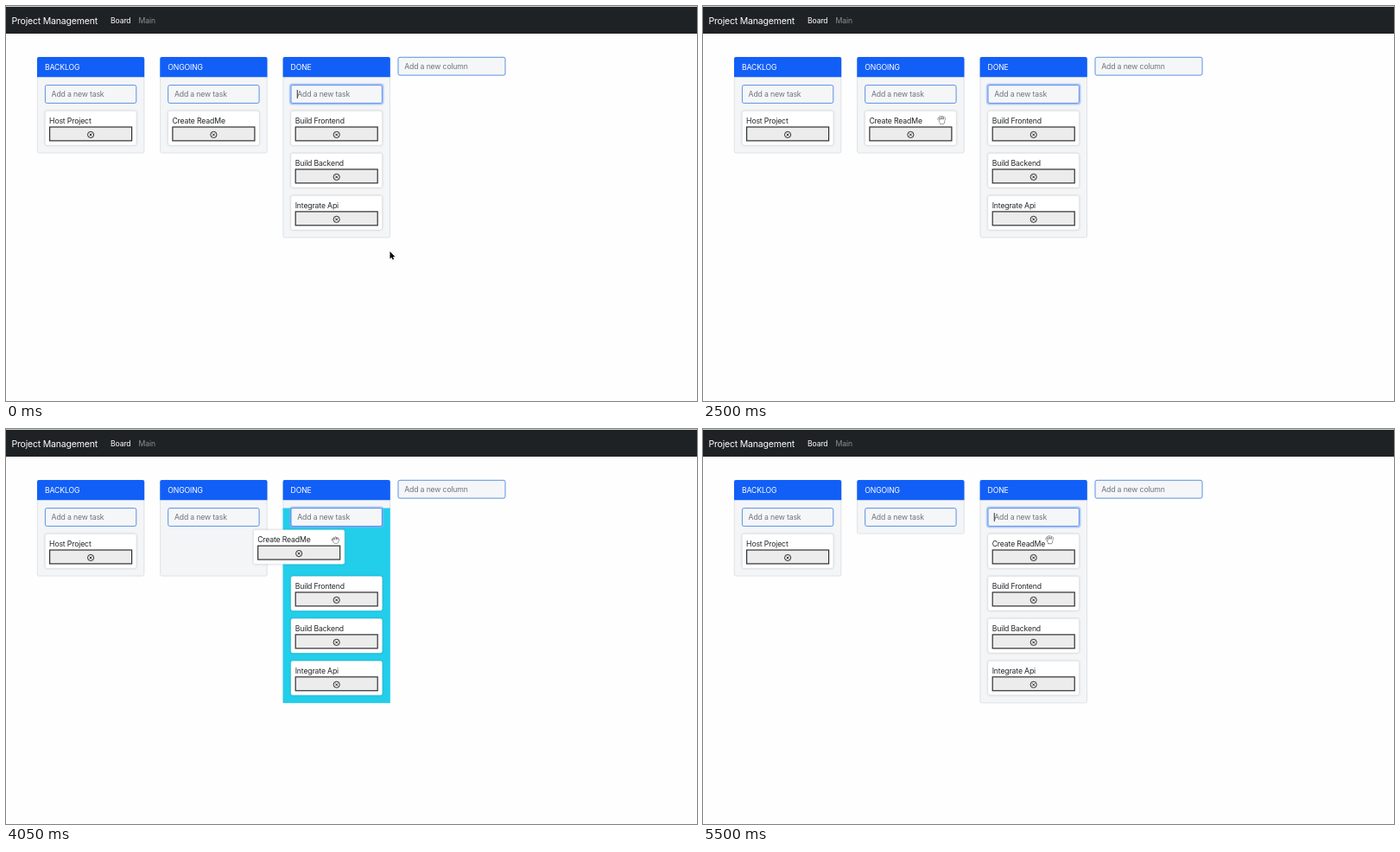
Recreate the animation shown at these times as an HTML page. Size 800 by 457 pixels, loop 5.55 s.

```html
<!DOCTYPE html>
<html lang="en">
<head>
<meta charset="utf-8">
<title>Project board</title>
<style>
  html, body { margin: 0; width: 100%; height: 100%; overflow: hidden; background: #fefefe; }
  svg { display: block; width: 800px; height: 457px; }
  text { font: 8.7px Inter, "Open Sans", sans-serif; letter-spacing: -.16px; fill: #212529; }
  .brand { font-size: 10.5px; letter-spacing: -.18px; }
  .light { fill: #fff; }
  .hint { fill: #6c757d; }
  .card { filter: drop-shadow(0 .8px .9px rgba(0, 0, 0, .2)); }
</style>
</head>
<body>
<svg id="stage" viewBox="0 0 800 457"></svg>
<script>
const LOOP = 5550, STEP = 50;
const TOP = 59, PITCH = 142.3, SLOT = 48.95, EMPTY_BOTTOM = 121.4;
const stage = document.getElementById('stage');

function add(parent, tag, attrs = {}, content) {
  const el = document.createElementNS('http://www.w3.org/2000/svg', tag);
  for (const key in attrs) el.setAttribute(key, attrs[key]);
  if (content) el.textContent = content;
  parent.appendChild(el);
  return el;
}
const box = (parent, x, y, width, height, fill, more = {}) =>
  add(parent, 'rect', { x, y, width, height, fill, ...more });
const label = (parent, x, y, content, cls = '') =>
  add(parent, 'text', { x, y, class: cls }, content);
const move = (el, x, y) => el.setAttribute('transform', `translate(${x} ${y})`);
const show = (el, on) => el.setAttribute('visibility', on ? 'visible' : 'hidden');

function field(parent, x, y, width, hint, focused) {
  if (focused) {
    box(parent, x - 1.2, y - 1.2, width + 2.4, 23.2, 'none',
      { rx: 3, stroke: '#86b0fa', 'stroke-opacity': .6, 'stroke-width': 2 });
  }
  box(parent, x, y, width, 20.8, '#f5f6f8',
    { rx: 2, stroke: focused ? '#4b84e6' : '#4a86e4', 'stroke-width': .9 });
  label(parent, x + 7.2, y + 13.7, hint, 'hint');
}

function column(index, title, focused) {
  const g = add(stage, 'g');
  move(g, 36 + index * PITCH, 0);
  const body = box(g, .3, TOP + .3, 123.6, 10, '#f4f5f7',
    { rx: 2, stroke: '#d9dce1', 'stroke-width': .8 });
  const cyan = box(g, 0, 91.5, 124.2, 10, '#22ceea');
  add(g, 'path', { d: 'M0 82.3V61Q0 59 2 59H122.2Q124.2 59 124.2 61V82.3Z', fill: '#115ff7' });
  label(g, 9, 74, title, 'light');
  field(g, 9.4, 91.6, 105.4, 'Add a new task', focused);
  return {
    set(bottom, over) {
      body.setAttribute('height', bottom - TOP - .6);
      cyan.setAttribute('height', bottom - 91.5);
      show(cyan, over);
    }
  };
}

function card(title) {
  const g = add(stage, 'g');
  box(g, 0, 0, 105.4, 39.4, '#fff',
    { rx: 2, stroke: '#e3e5e8', 'stroke-width': .5, class: 'card' });
  label(g, 4.7, 14.6, title);
  box(g, 5.2, 18.4, 95, 15.9, '#ececec', { stroke: '#303030', 'stroke-width': 1.2 });
  add(g, 'circle', { cx: 52.7, cy: 27.3, r: 3.6, fill: 'none', stroke: '#111', 'stroke-width': .85 });
  add(g, 'path', { d: 'M51.3 25.9l2.8 2.8m0-2.8l-2.8 2.8', stroke: '#111', 'stroke-width': .85 });
  return g;
}
const place = (el, col, slot, dx = 0, dy = 0) =>
  move(el, 45.4 + col * PITCH + dx, 121.6 + slot * SLOT + dy);

function pointer(shape, creases = '') {
  const g = add(stage, 'g', { 'stroke-linejoin': 'round', 'stroke-linecap': 'round' });
  const arrow = !creases;
  add(g, 'path', {
    d: shape, fill: arrow ? '#000' : '#fff', stroke: arrow ? '#fff' : '#111',
    'stroke-width': arrow ? .7 : .85, 'paint-order': 'stroke'
  });
  if (creases) add(g, 'path', { d: creases, fill: 'none', stroke: '#111', 'stroke-width': .6 });
  return g;
}

// Static page
box(stage, 0, 0, 800, 457, '#fefefe');
box(stage, 0, 0, 800, 32, '#1e2225');
box(stage, 0, 0, 800, 1, '#cfd3d4');
label(stage, 6.4, 20.6, 'Project Management', 'brand light');
label(stage, 121, 20, 'Board', 'light');
label(stage, 153.6, 20, 'Main').style.fill = '#8f9193';
field(stage, 454, 59.3, 124, 'Add a new column');

// Board
const backlog = column(0, 'BACKLOG');
const ongoing = column(1, 'ONGOING');
const done = column(2, 'DONE', true);
const caret = box(stage, 336.8, 97, .9, 10, '#222');
place(card('Host Project'), 0, 0);
const doneCards = ['Build Frontend', 'Build Backend', 'Integrate Api'].map(card);
const dragged = card('Create ReadMe');
const arrow = pointer('M0 0V8.4L1.9 6.7L3.2 9.6L4.6 9L3.4 6.2H6Z');
const openHand = pointer(
  'M-2.5.9L-4-.7C-4.8-1.8-3.5-2.6-2.6-1.7L-3-3.1C-3-4.3-1.7-4.5-1.4-3.5C-1.2-4.8.4-4.8.6-3.6C1-4.5 2.2-4.2 2.2-3C3-3.6 4-3 3.8-1.9L3.4 1.5C3.2 2.8 2.6 3.3 2.4 4.4H-1.5C-1.6 3.2-2.1 2.5-2.5.9Z',
  'M-1.3-3.2L-.9-1.2M.6-3.3L.6-1.2M2.2-2.8L2-1M-2.6-1.6L-1.9-.2');
const fist = pointer(
  'M-3.6-.2C-3.8-1.5-3-2-2.4-1.8C-2.5-3-1.3-3.4-.8-2.7C-.2-3.5.8-3.2 1-2.6C1.7-3.1 2.6-2.7 2.6-2C3.5-2.1 3.8-1.4 3.7-.4C3.7 1.4 2.9 2.2 2.5 3.6H-1.5C-1.8 2.3-3.4 1.6-3.6-.2Z',
  'M-2.3-1.7V.2M-.7-2.5V-.8M1-2.4V-.8M2.5-1.8V-.6');

// Motion
const RELEASE = 4750, SETTLED = 5080, SHIFT = 3833;
const pointerPath = [
  [0, 444.5, 284], [50, 439, 291], [100, 432.6, 298], [1100, 432.6, 298],
  [1600, 338.2, 217], [1700, 329.5, 200], [2250, 278, 132], [2350, 278, 132],
  [2500, 276.2, 132], [2850, 276.2, 132], [3500, 326, 131], [3900, 373, 128.2],
  [4400, 401.2, 128.6], [5550, 401.2, 128.2]
];
const dragPath = [
  [2900, 0, 0], [3500, 37.9, -1.4], [3900, 89.6, -5], [4400, 120.2, -4.5], [RELEASE, 120.2, -4.5]
];
const caretOn = [[0, 475], [950, 1475], [1975, 2450], [2950, 3925], [4375, 4900], [5425, LOOP]];

function along(path, t) {
  if (t <= path[0][0]) return path[0].slice(1);
  for (let i = 1; i < path.length; i++) {
    const [t0, x0, y0] = path[i - 1], [t1, x1, y1] = path[i];
    if (t <= t1) {
      const k = (t - t0) / (t1 - t0);
      return [x0 + (x1 - x0) * k, y0 + (y1 - y0) * k];
    }
  }
  return path[path.length - 1].slice(1);
}

// cubic-bezier(.2, 0, 0, 1) over the given span
function ease(t, start, duration) {
  const p = Math.min(1, Math.max(0, (t - start) / duration));
  let lo = 0, hi = 1;
  for (let i = 0; i < 24; i++) {
    const s = (lo + hi) / 2;
    if (.6 * s * (1 - s) ** 2 + s ** 3 < p) lo = s; else hi = s;
  }
  return lo * lo * (3 - 2 * lo);
}

function render(t) {
  const dragging = t >= 2900 && t < RELEASE;
  const held = t >= 2900 && t < SETTLED;
  const overDone = t >= SHIFT;

  backlog.set(EMPTY_BOTTOM + SLOT, false);
  ongoing.set(EMPTY_BOTTOM + SLOT * (1 - ease(t, SETTLED, 170)), held && !overDone);
  done.set(EMPTY_BOTTOM + SLOT * (3 + ease(t, 3867, 200)), held && overDone);
  doneCards.forEach((el, i) => place(el, 2, i + ease(t, SHIFT, 200)));

  const [dx, dy] = along(dragPath, t);
  const drop = ease(t, RELEASE, SETTLED - RELEASE);
  place(dragged, 1, 0, dx + (PITCH - dx) * drop, dy * (1 - drop));

  const [x, y] = along(pointerPath, t);
  const hand = x < 293 && y > 121 && y < 161 || t >= 2900;
  show(arrow, !hand);
  show(openHand, hand && !dragging);
  show(fist, dragging);
  [arrow, openHand, fist].forEach(el => move(el, x, y));
  show(caret, caretOn.some(([from, to]) => t >= from && t < to));
}

const began = performance.now();
function tick() {
  const t = (performance.now() - began) % LOOP;
  render(Math.floor(t / STEP) * STEP);
  requestAnimationFrame(tick);
}
tick();
</script>
</body>
</html>
```
